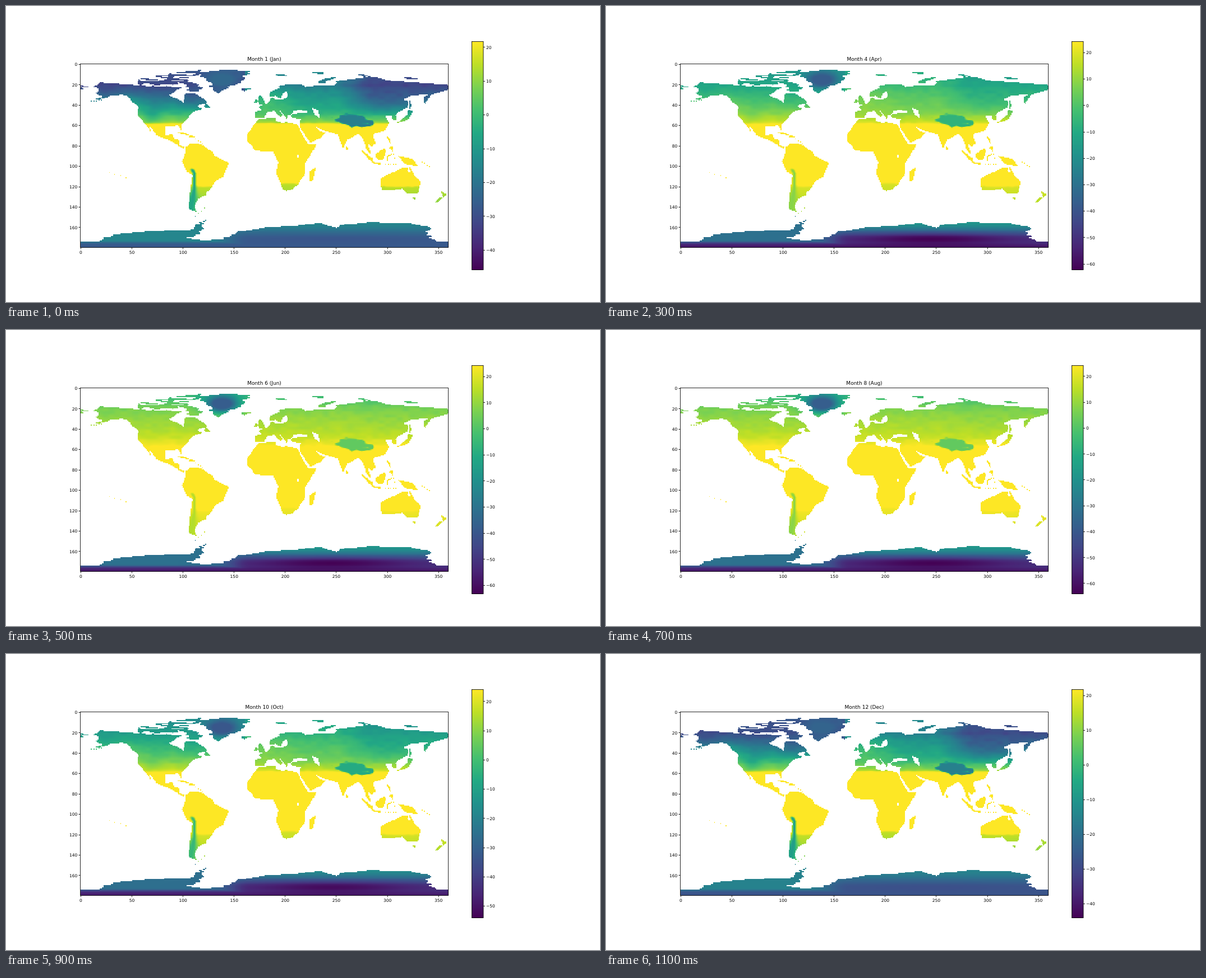
Recreate the animation shown at these times as an HTML page with a canvas. Size 1059 px wide and 529 px high, loop 1.2 s.

```html
<!DOCTYPE html>
<html lang="en">
<head>
<meta charset="utf-8">
<title>Monthly temperature</title>
<style>
  html, body { margin: 0; width: 100%; height: 100%; overflow: hidden; background: #fff; }
  canvas { display: block; }
</style>
</head>
<body>
<canvas id="stage" width="1059" height="529"></canvas>
<script>
const W = 360, H = 180;
const BOX = { x: 132.5, y: 103.5, w: 656, h: 328 };
const BAR = { x: 830.5, y: 63.5, w: 20.5, h: 408 };
const names = ['Jan', 'Feb', 'Mar', 'Apr', 'May', 'Jun', 'Jul', 'Aug', 'Sep', 'Oct', 'Nov', 'Dec'];
const coldest = [-45.8, -47.5, -55.1, -62.2, -63, -63.2, -65, -64, -61, -54, -46, -44];

const clamp = (v, a = 0, b = 1) => Math.min(b, Math.max(a, v));
const mix = (a, b, k) => a + (b - a) * k;
const smooth = (a, b, v) => { const k = clamp((v - a) / (b - a)); return k * k * (3 - 2 * k); };
const bell = (x, y, cx, cy, rx, ry) => Math.exp(-(((x - cx) / rx) ** 2) - ((y - cy) / ry) ** 2);
const hash = (x, y) => { const s = Math.sin(x * 12.9898 + y * 78.233) * 43758.5453; return s - Math.floor(s); };

function noise(x, y) {
  const i = Math.floor(x), j = Math.floor(y), k = smooth(0, 1, x - i);
  return mix(mix(hash(i, j), hash(i + 1, j), k), mix(hash(i, j + 1), hash(i + 1, j + 1), k), smooth(0, 1, y - j));
}

const range = m => ({ low: coldest[m], high: 21.7 + Math.min(2.5, 1.2 * Math.min(m, 11 - m)) });

// Yearly swing from 0 in winter to 1 in summer; lead is in months
const season = (m, lead = 0) => (1 - Math.cos((m + lead) * Math.PI / 6)) / 2;
const polarNight = m => Math.sqrt(clamp((-46 - coldest[m]) / 18));

// Key points of the coasts: x = longitude + 180, y = 90 - latitude
const coasts = [
  // North America, Baffin, Newfoundland, Cuba, Hispaniola
  'M14 23 17 18.5 39 20 68 22 97 23 92 27 86 31 98 36 101 39 103 29 112 29 121 35 124 38 113 41 119 44 110 47 104 54 99 59 99 65 96 60 83 61 83 71 90 69 92 74 97 75 97 80 102 82 100 82.5 88 75 75 70 66 58 69 66 63 58 56 50 57 42 50 36 46 31 41 30 30 31 22 34 15 35 23 32 15 29 19 26Z',
  'M91 17 110 19 118 23 115 27 104 26 105 21ZM121 42 123 39 127 43ZM95 67.5 100 67 106 70ZM106 71.5 109 70 112 71.5Z',
  // Greenland, Iceland
  'M119 13 117 9 126 7.5 148 6 166 8 160 11 158 17 148 21 141 24 135 29 128 24 127 19ZM156 24 165 24 161 26.5Z',
  // South America
  'M103 82 108 78 118 79 130 87 131 90 145 97 140 110 132 115 126 124 122 126 123 128 115 132 112 138 112 142 114 145 106 142 108 124 110 109 104 105 99.5 95 103 88Z',
  // Africa, Madagascar
  'M163 70 163 75 172 85 189 86 194 97 192 107 198 122 201 124.5 207 123 213 118 220 107 220 97 231 79 223 79 217 70 213 60 200 57 200 59 190 56 191 53 174 54.5 170 60ZM224 106 230 102 227 115 224 115Z',
  // Scandinavia, British Isles
  'M185 31 186 28 199 20 211 20 221 22 216 26 210 31 203 30 202 27 205 24 198 29 196 34 191 31 187 32ZM175 40 181 39 177 31.5 174 32ZM170 38 174 37 172 35Z',
  // Europe
  'M210 30 218 44 208 46 207 49 203 50 202 54 196 45.5 193 45 198 50 196 52 190 46 183 47 179 53 171 53 171 47 178 46 175 42 183 39 188 33 191 35.5 199 35 204 31Z',
  // Northern, western and eastern Asia
  'M208 21 217 25 224 22 247 21 251 17 284 12.5 300 16.5 340 19.5 360 21 360 25 343 30 337 39 336 33 343 29 323 31 315 35 321 37 320 42 312 47 226 47 211 44 202 35 204 30ZM231 19 236 15 248 13 237 19Z',
  'M206.5 50 215 48 222 48 222 46 262 46 262 72 257 82 252 69 237 64.5 228 60 234 66 240 67.5 235 72 225 77 215 62 216 53.5 207 53Z',
  'M255 45 312 46 308 50 309 55 306 55 305 51 298 51 302 58 298 65 286 69 289 78 285 81 281 78 284 88 280 84 277 73 272 68 262 74 255 72ZM260 81 262 83 260 84Z',
  // Japan, Philippines, Sunda Islands, New Guinea
  'M310 58 315 54 320 50 321 45 325 47 321 54ZM322 36 324 41 322 44ZM300 71.5 302 72 303 77ZM302 82 306 81 306 84Z',
  'M275 84.5 286 93 286 96 282 93ZM285 96.5 294 97.5 294 99ZM289 88.5 297 83 299 85 296 94 290 93ZM300 90 305 88.5 301 91 301 96ZM311 90.5 318 92 325 93.5 330 100 318 98Z',
  // Australia, Tasmania, New Zealand
  'M294 112 303 108 315 102 321 102 320 105 323 107 322.5 101 326 109 333 116 330 127 320 127 315 122 303 124 295 124ZM325 131 328 131 327 133.5ZM353 125 358 128 355 131ZM352 131 354 131.5 349 136 346.5 136Z',
  // Antarctica
  'M0 174 17 174 35 167 75 164 107 163 121 153 117 166 104 171 118 173 138 172.5 155 165 180 160.5 212 159 234 156 250 161 256 158 284 155.5 322 156.5 341 160 339 167 347 174 360 174 360 180 0 180Z'
];
const icyIslands = 'M55 20 58 15 78 11 100 8 118 6.5 120 9 104 14 106 17 92 20 80 22ZM191 10 206 10 196 13ZM227 8 243 8 235 10ZM272 10 284 11 278 12.5ZM317 13.5 330 14 322 16ZM0 21 9 23 0 25Z';
const lakes = 'M227 43 233 45 234 53 229 50ZM212 89 214 89 214 92 212 92Z';

// Scattered island chains: from x, y to x, y, number of cells
const chains = [[10, 36, 20, 35, 5], [28, 106, 44, 111, 4], [110, 71, 119, 78, 5], [298, 98, 308, 98, 5],
  [303, 77, 307, 92, 5], [334, 96, 341, 100, 4], [112, 149, 121, 141, 4]];

function ramp(points, v) {
  let i = 0;
  while (i < points.length - 2 && v > points[i + 1][0]) i++;
  const [a, b] = [points[i], points[i + 1]];
  return mix(a[1], b[1], clamp((v - a[0]) / (b[0] - a[0])));
}

const stops = '440154 482475 414487 355f8d 2a788e 21918c 22a884 44bf70 7ad151 bddf26 fde725'
  .split(' ').map(c => [0, 2, 4].map(i => parseInt(c.slice(i, i + 2), 16)));
function viridis(v) {
  const p = clamp(v) * 10, i = Math.min(9, Math.floor(p));
  return stops[i].map((c, k) => Math.round(mix(c, stops[i + 1][k], p - i)));
}

const winter = [[5, -27], [20, -32], [30, -24], [47, -3], [57, 11], [59, 26]];
const summer = [[5, -5], [20, 9], [48, 18], [60, 28]];

function northTemp(x, y, m) {
  const warmth = season(m);
  const west = 1 - smooth(245, 290, x);
  const cold = ramp(winter, y) + (x > 160
    ? west * clamp((48 - y) / 20) * 14 + 8 * bell(x, y, 183, 36, 22, 16) - (1 - west) * 8 * bell(x, y, 300, 40, 60, 11)
    : 7 * bell(x, y, 50, 38, 14, 12) - 6 * bell(x, y, 70, 52, 8, 10) - 5 * bell(x, y, 110, 36, 12, 7));
  const t = mix(cold, ramp(summer, y), warmth) + (noise(x / 6, y / 3) - .5) * 3;
  const ice = Math.min(1, 1.3 * bell(x, y, 138, 15, 17, 9));
  const reach = Math.hypot((x - 268) / 17, (y - 55 - (x - 268) * .13) / 6) + (noise(x / 5, y / 2) - .5) * .6;
  const plateau = 1 - smooth(.8, 1.1, reach);
  return mix(mix(t, -23 - 15 * polarNight(m), ice), mix(-17, 4, warmth), plateau);
}

function southTemp(x, y, m) {
  const row = y + (x > 190 && x < 220 ? 3 : 0) + noise(x / 4, 7) - .5;
  const t = mix(ramp([[118, 27], [120.5, 15], [145, 7]], row), ramp([[117, 28], [121, 23], [145, 17]], row), season(m));
  if (x > 130) return t;
  const ridge = y < 122 ? 111 - Math.max(0, 107 - y) * .5 : mix(111, 107, (y - 122) / 23);
  const andes = bell(x, 0, ridge, 0, mix(2, 5, smooth(120, 135, y)), 1) * smooth(101, 104, y);
  return mix(t, mix(-8, 14, season(m, 1)), andes);
}

function polarTemp(x, y, m) {
  const night = polarNight(m);
  const east = smooth(120, 165, x);
  const inland = Math.max(smooth(172, 177, y), east * smooth(155, 172, y));
  const core = bell(x, y, 245, 171, 75, 6);
  const coast = mix(-15, mix(-31, -18, east), night);
  return mix(coast, mix(-27, -51, night), inland) - core * mix(1, 13, night) - smooth(174, 179, y) * 7 * night;
}

function temperature(x, y, m) {
  return y > 148 ? polarTemp(x, y, m) : y > 100 ? southTemp(x, y, m) : northTemp(x, y, m);
}

function gridCanvas() {
  const c = document.createElement('canvas');
  c.width = W; c.height = H;
  return c;
}

function rasterize(shapes, holes = '') {
  const g = gridCanvas().getContext('2d');
  g.lineWidth = .4;
  for (const d of shapes) {
    g.fill(new Path2D(d));
    g.stroke(new Path2D(d));
  }
  g.globalCompositeOperation = 'destination-out';
  g.fill(new Path2D(holes));
  const data = g.getImageData(0, 0, W, H).data;
  return (x, y) => data[(y * W + clamp(x, 0, W - 1)) * 4 + 3] > 115;
}

function landMask() {
  const solid = rasterize(coasts, lakes), icy = rasterize([icyIslands]);
  const mask = new Uint8Array(W * H);
  for (let y = 0; y < H; y++) {
    // Near the poles rows shift and islands break into streaks
    const polar = y < 25 || y > 150;
    const shift = polar ? Math.round((hash(y, 3) - .5) * 5) : 0;
    for (let x = 0; x < W; x++) {
      const streak = hash(Math.floor(x / 6 + hash(y, 9)), y) > .4;
      mask[y * W + x] = solid(x + shift, y) || (icy(x, y) && streak);
    }
  }
  for (const [x0, y0, x1, y1, n] of chains) {
    for (let i = 0; i < n; i++) {
      const k = i / (n - 1);
      mask[Math.round(mix(y0, y1, k)) * W + Math.round(mix(x0, x1, k))] = 1;
    }
  }
  return mask;
}

const mask = landMask();
const maps = names.map((_, m) => {
  const c = gridCanvas(), g = c.getContext('2d'), img = g.createImageData(W, H);
  const { low, high } = range(m);
  mask.forEach((on, i) => {
    if (!on) return;
    const t = temperature(i % W, Math.floor(i / W), m);
    img.data.set([...viridis((t - low) / (high - low)), 255], i * 4);
  });
  g.putImageData(img, 0, 0);
  return c;
});

const ctx = document.getElementById('stage').getContext('2d');

function label(text, x, y, align, size = 7.5) {
  ctx.font = `${size}px "DejaVu Sans", sans-serif`;
  ctx.textAlign = align;
  ctx.fillText(text, x, y);
}

function tick(x, y, dx, dy) {
  ctx.beginPath();
  ctx.moveTo(x, y);
  ctx.lineTo(x + dx, y + dy);
  ctx.stroke();
}

const snap = v => Math.floor(v) + .5;

function drawMonth(m) {
  const { low, high } = range(m);
  ctx.fillStyle = '#fff';
  ctx.fillRect(0, 0, 1059, 529);
  ctx.imageSmoothingEnabled = false;
  ctx.drawImage(maps[m], BOX.x, BOX.y, BOX.w, BOX.h);
  for (let i = 0; i < BAR.h; i++) {
    ctx.fillStyle = `rgb(${viridis(1 - (i + .5) / BAR.h)})`;
    ctx.fillRect(BAR.x, BAR.y + .5 + i, BAR.w, 1);
  }

  ctx.fillStyle = ctx.strokeStyle = '#000';
  ctx.lineWidth = .85;
  ctx.strokeRect(BOX.x, BOX.y, BOX.w, BOX.h);
  ctx.strokeRect(BAR.x, BAR.y, BAR.w, BAR.h);
  const cell = BOX.w / W, bottom = BOX.y + BOX.h;
  for (let v = 0; v < W; v += 50) {
    const x = BOX.x + (v + .5) * cell;
    tick(snap(x), bottom, 0, 3);
    label(v, x, bottom + 11.3, 'center');
  }
  for (let v = 0; v < H; v += 20) {
    const y = BOX.y + (v + .5) * cell;
    tick(BOX.x, snap(y), -3, 0);
    label(v, 127.2, y + 2.7, 'right');
  }
  for (let v = Math.ceil(low / 10) * 10; v <= high; v += 10) {
    const y = BAR.y + (high - v) / (high - low) * BAR.h;
    tick(851, snap(y), 3, 0);
    label(String(v).replace('-', '\u2212'), 856, y + 2.8, 'left');
  }
  label(`Month ${m + 1} (${names[m]})`, BOX.x + BOX.w / 2, 98, 'center', 9);
}

let shown = -1;
function frame() {
  const m = Math.floor(performance.now() / 100) % 12;
  if (m !== shown) drawMonth(shown = m);
  requestAnimationFrame(frame);
}
frame();
</script>
</body>
</html>
```
